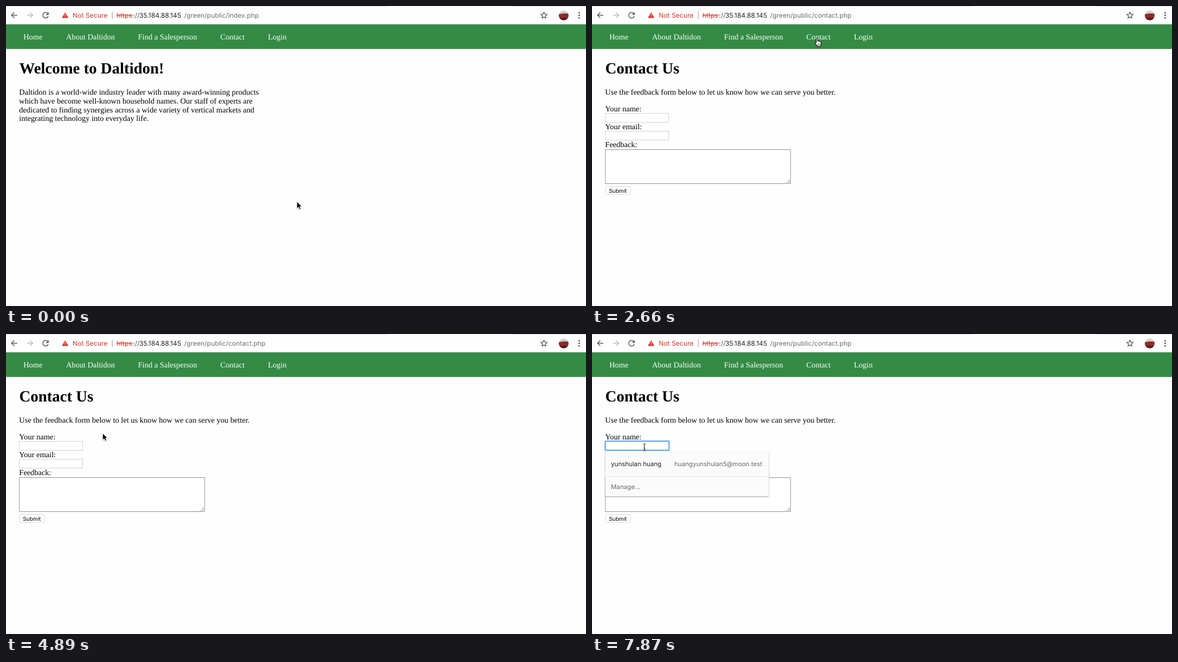
Animation of 1040x538 px, one loop 8 s. Source, as an HTML page:

```html
<!DOCTYPE html>
<html lang="en">
<head>
<meta charset="utf-8">
<title>Contact page</title>
<style>
  html, body { margin: 0; width: 100%; height: 100%; overflow: hidden; background: #fefefe; }
  svg { display: block; width: 1040px; height: 538px; }
  text { white-space: pre; text-rendering: geometricPrecision; }
  .serif { font: 14px "Liberation Serif", Tinos, serif; }
  .head { font: bold 28px "Liberation Serif", Tinos, serif; }
  .ui { font: 11.8px Inter, Roboto, sans-serif; }
  .small { font: 11.2px Inter, Roboto, sans-serif; }
  .button { font: 9.8px Inter, Roboto, sans-serif; }
  .icon { fill: none; stroke: #5a5e63; stroke-width: 1.5; }
  .field { fill: #fff; stroke: #d2d2d2; }
</style>
</head>
<body>
<svg viewBox="0 0 1040 538">
  <defs>
    <clipPath id="round"><circle cx="1000" cy="16.8" r="8.8"/></clipPath>
    <filter id="shade" x="-10%" y="-10%" width="120%" height="130%">
      <feDropShadow dx="0" dy="1" stdDeviation="1.2" flood-opacity=".38"/>
    </filter>
    <filter id="soft" x="-40%" y="-40%" width="180%" height="190%">
      <feDropShadow dx="0" dy="1" stdDeviation=".8" flood-opacity=".3"/>
    </filter>
  </defs>
  <rect width="1040" height="538" fill="#fefefe"/>

  <!-- toolbar -->
  <path d="M0 .5H685M905 .5H1040" stroke="#dedede"/>
  <path d="M0 32.5H1040" stroke="#e4e6e4"/>
  <path class="icon" d="M20.3 16.5H10M14.8 11.5L9.8 16.5L14.8 21.5"/>
  <path class="icon" d="M37.5 16.5H47.8M43 11.5L48 16.5L43 21.5" style="stroke:#bcbec0"/>
  <g id="reload">
    <path class="icon" d="M74.7 13.3A5 5 0 1 0 75.7 18.2"/>
    <path d="M76.6 10.8V15.9H71.5Z" fill="#5a5e63"/>
  </g>
  <path id="stop" class="icon" d="M66 11.5L76 21.5M76 11.5L66 21.5"/>
  <path d="M106 11.6L111.8 21.6H100.2Z" fill="#d93025"/>
  <path d="M106 14.8V18M106 19V20.3" stroke="#fff" stroke-width="1.1"/>
  <g class="ui">
    <text x="119.6" y="20.9" fill="#d5342b">Not Secure</text>
    <text x="198" y="20.9" fill="#d5342b">https</text>
    <text x="227.6" y="20.9" fill="#55585c">://</text>
    <text x="239" y="20.9" fill="#202124">35.184.88.145</text>
    <text id="path" x="319.6" y="20.9" fill="#6c7074"></text>
  </g>
  <path d="M198 17H228" stroke="#d5342b"/>
  <path d="M190.5 10V23.5" stroke="#9a9a9a"/>
  <path id="star" class="icon" stroke-linejoin="round" style="stroke-width:1.3"/>
  <g clip-path="url(#round)">
    <rect x="990" y="7" width="20" height="20" fill="#d5d0cd"/>
    <path d="M990 15Q1000 12 1010 14V27H990Z" fill="#8d2a2b"/>
    <path d="M990 22Q1000 20 1010 22V27H990Z" fill="#54201f"/>
  </g>
  <g fill="#5a5e63">
    <circle cx="1027.7" cy="12" r="1.5"/><circle cx="1027.7" cy="16.6" r="1.5"/><circle cx="1027.7" cy="21.2" r="1.5"/>
  </g>

  <!-- navigation -->
  <rect y="33" width="1040" height="44" fill="#348b46"/>
  <g class="serif" fill="#fff">
    <text x="31.2" y="60.4">Home</text>
    <text x="107.7" y="60.4">About Daltidon</text>
    <text x="236.8" y="60.4">Find a Salesperson</text>
    <text x="384.3" y="60.4">Contact</text>
    <text x="469.8" y="60.4">Login</text>
  </g>

  <g id="home" class="serif">
    <text class="head" x="23.7" y="120.7">Welcome to Daltidon!</text>
    <text x="23.6" y="159.1">Daltidon is a world-wide industry leader with many award-winning products</text>
    <text x="23.6" y="174.9">which have become well-known household names. Our staff of experts are</text>
    <text x="23.6" y="190.6">dedicated to finding synergies across a wide variety of vertical markets and</text>
    <text x="23.6" y="206.3">integrating technology into everyday life.</text>
  </g>

  <g id="contact" class="serif">
    <text class="head" x="23.7" y="120.7">Contact Us</text>
    <text x="23.6" y="159.1">Use the feedback form below to let us know how we can serve you better.</text>
    <text x="23.6" y="188.7">Your name:</text>
    <rect class="field" x="24" y="192.5" width="113.5" height="16"/>
    <text x="23.6" y="220.9">Your email:</text>
    <rect class="field" x="24" y="224.5" width="113.5" height="16"/>
    <text x="23.6" y="253.2">Feedback:</text>
    <rect x="24" y="257.5" width="332" height="61" fill="#fff" stroke="#929292"/>
    <path d="M348.5 317.5L355 311M352 317.5L355 314.5" stroke="#777" stroke-width=".9"/>
    <rect x="24" y="323.7" width="45.5" height="14.3" rx="3" fill="#fff" stroke="#d6d6d6"/>
    <text class="button" x="30.3" y="334.6">Submit</text>
  </g>

  <g id="focus">
    <rect x="23.6" y="192.1" width="114.6" height="16.6" rx="1.5" fill="#fff" stroke="#a9cdf8" stroke-width="3"/>
    <rect x="24" y="192.5" width="113.8" height="15.8" rx="1" fill="#fff" stroke="#5a9eee" stroke-width="1.5"/>
    <path id="caret" d="M26.5 195V206" stroke="#111"/>
    <rect x="24" y="210" width="293" height="81" rx="2" fill="#fbfbfb" filter="url(#shade)"/>
    <path d="M24 255.5H317" stroke="#e4e4e4"/>
    <g class="small">
      <text x="34" y="237" fill="#202124">yunshulan huang</text>
      <text x="147.7" y="237" fill="#65696d">huangyunshulan5@moon.test</text>
      <text x="34" y="277.7" fill="#65696d">Manage...</text>
    </g>
  </g>

  <!-- pointers -->
  <g id="arrow" filter="url(#soft)">
    <path d="M.6 .8V13.2L3.4 10.6L5.3 14.8L7.5 13.8L5.7 9.8H9.4Z" fill="#000" stroke="#fff" stroke-width=".9"/>
  </g>
  <g id="hand" filter="url(#soft)">
    <path d="M2.6 8.6V1.9Q2.8.7 3.8.7Q4.9.7 5.1 1.9V5.5Q6.9 4.8 7.3 6.1Q8.9 5.5 9.4 6.8Q11 6.4 11.2 8V10.4Q11 12.6 10 14.6H4.4Q3.4 12.4.9 9.2Q.3 7.9 1.2 7.5Q2 7.4 2.6 8.6Z" fill="#fff" stroke="#000"/>
    <path d="M5.4 9.8V12.5M7.2 9.8V12.5M9 9.8V12.5" stroke="#000" stroke-width=".7"/>
  </g>
  <path id="beam" d="M-2.5-6Q-.4-6 0-4.8Q.4-6 2.5-6M0-4.8V4.8M-2.5 6Q-.4 6 0 4.8Q.4 6 2.5 6M-1.4 2H1.4" fill="none" stroke="#222" stroke-width="1.1"/>
</svg>
<script>
  const LOOP = 8000;
  const el = id => document.getElementById(id);
  const show = (id, on) => { el(id).style.display = on ? "" : "none"; };

  const star = Array.from({ length: 10 }, (_, i) => {
    const r = i % 2 ? 2.7 : 6.2, a = i * Math.PI / 5;
    return (964.6 + r * Math.sin(a)).toFixed(2) + " " + (16.9 - r * Math.cos(a)).toFixed(2);
  });
  el("star").setAttribute("d", "M" + star.join("L") + "Z");

  // first step, last step, step count, start point, end point
  const moves = [
    [300, 1190, 7, [521, 350], [279.6, 213]],
    [1480, 1920, 4, [279.6, 213], [399.6, 57.5]],
    [3110, 4000, 7, [399.6, 57.5], [400.2, 100]],
    [4440, 5190, 6, [400.2, 100], [93, 204]],
    [6080, 6380, 2, [93, 204], [94, 203]]
  ];
  const caretFlips = [5930, 6380, 6830, 7420, 7870];
  const ease = p => p * p * (3 - 2 * p);

  function pointer(t) {
    let point = moves[0][3];
    for (const [first, last, count, from, to] of moves) {
      if (t < first) break;
      const gap = (last - first) / (count - 1);
      const step = Math.min(count, Math.floor((t - first) / gap + 0.04) + 1);
      const p = ease(step / count);
      point = from.map((v, i) => v + (to[i] - v) * p);
    }
    return point;
  }

  function draw(t) {
    const [x, y] = pointer(t);
    const kind = y < 72 ? "hand" : x < 138 && y > 190 ? "beam" : "arrow";
    for (const id of ["arrow", "hand", "beam"]) show(id, id === kind);
    el(kind).setAttribute("transform", `translate(${x.toFixed(2)} ${y.toFixed(2)})`);

    const loading = t >= 2220 && t < 2660;
    show("stop", loading);
    show("reload", !loading);
    el("path").textContent = "/green/public/" + (t < 2520 ? "index" : "contact") + ".php";
    show("home", t < 2660);
    show("contact", t >= 2660);
    show("focus", t >= 5340);
    show("caret", caretFlips.filter(f => t >= f).length % 2 === 0);
  }

  const start = performance.now();
  function tick() {
    draw((performance.now() - start) % LOOP);
    requestAnimationFrame(tick);
  }
  tick();
</script>
</body>
</html>
```
